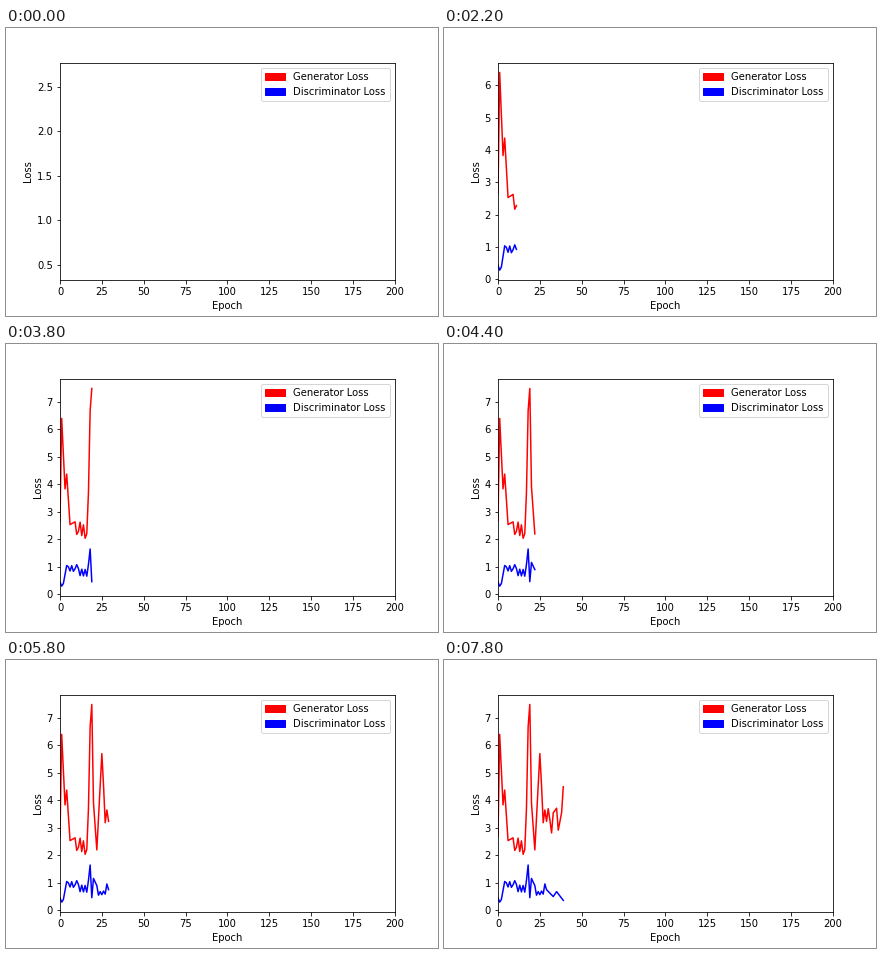
A matplotlib script that plays this animation: 432 px wide and 288 px high, repeating every 8000 ms.

```python
import matplotlib.pyplot as plt
import numpy as np
from matplotlib.animation import FuncAnimation
from matplotlib.patches import Patch

EPOCHS = 200
FRAMES = 40
MARGIN = 0.05
epochs = np.arange(FRAMES)


def curve(turns, ripples):
    """Straight runs between turning points, plus zigzags of a given size."""
    loss = np.interp(epochs, *zip(*turns))
    for first, last, size in ripples:
        span = epochs[first:last + 1]
        loss[span] += size * (-1.0) ** span
    return loss


gen_loss = curve(
    [(0, 2.66), (1, 6.4), (3, 3.83), (4, 4.37), (6, 2.53), (9, 2.63),
     (10, 2.17), (12, 2.4), (16, 2.2), (17, 3.7), (18, 6.67), (19, 7.49),
     (20, 3.9), (22, 2.19), (25, 5.7), (27, 3.4), (31, 3.5), (32, 2.81),
     (33, 3.54), (35, 3.71), (36, 2.91), (38, 3.55), (39, 4.49)],
    ripples=[(12, 15, 0.22), (27, 31, 0.22)],
)
disc_loss = curve(
    [(0, 0.44), (1, 0.288), (2, 0.38), (4, 1.04), (6, 0.94), (9, 0.92),
     (10, 1.07), (12, 0.79), (16, 0.77), (17, 1.08), (18, 1.64), (19, 0.45),
     (20, 1.15), (22, 0.89), (23, 0.6), (27, 0.64), (28, 0.95), (29, 0.74),
     (33, 0.49), (35, 0.67), (39, 0.35)],
    ripples=[(6, 8, -0.1), (12, 16, -0.12), (23, 27, 0.06)],
)

plt.rcParams.update({"font.family": "DejaVu Sans", "font.size": 10})
fig, ax = plt.subplots(figsize=(6, 4), dpi=72, facecolor="white")
fig.subplots_adjust(left=0.125, right=0.9, bottom=0.125, top=0.88)

gen_line, = ax.plot([], [], color="red", lw=1.5)
disc_line, = ax.plot([], [], color="blue", lw=1.5)
ax.set_xlim(0, EPOCHS)
ax.set_xlabel("Epoch")
ax.set_ylabel("Loss")
ax.legend(
    handles=[
        Patch(color="red", label="Generator Loss"),
        Patch(color="blue", label="Discriminator Loss"),
    ],
    loc="upper right",
)


def update(epoch):
    n = epoch + 1
    gen_line.set_data(epochs[:n], gen_loss[:n])
    disc_line.set_data(epochs[:n], disc_loss[:n])
    # Fit the loss axis to the data so far
    low, high = disc_loss[:n].min(), gen_loss[:n].max()
    pad = MARGIN * (high - low)
    ax.set_ylim(low - pad, high + pad)
    return gen_line, disc_line


anim = FuncAnimation(fig, update, frames=FRAMES, interval=200,
                     repeat=True, repeat_delay=0, blit=False)
plt.show()
```
